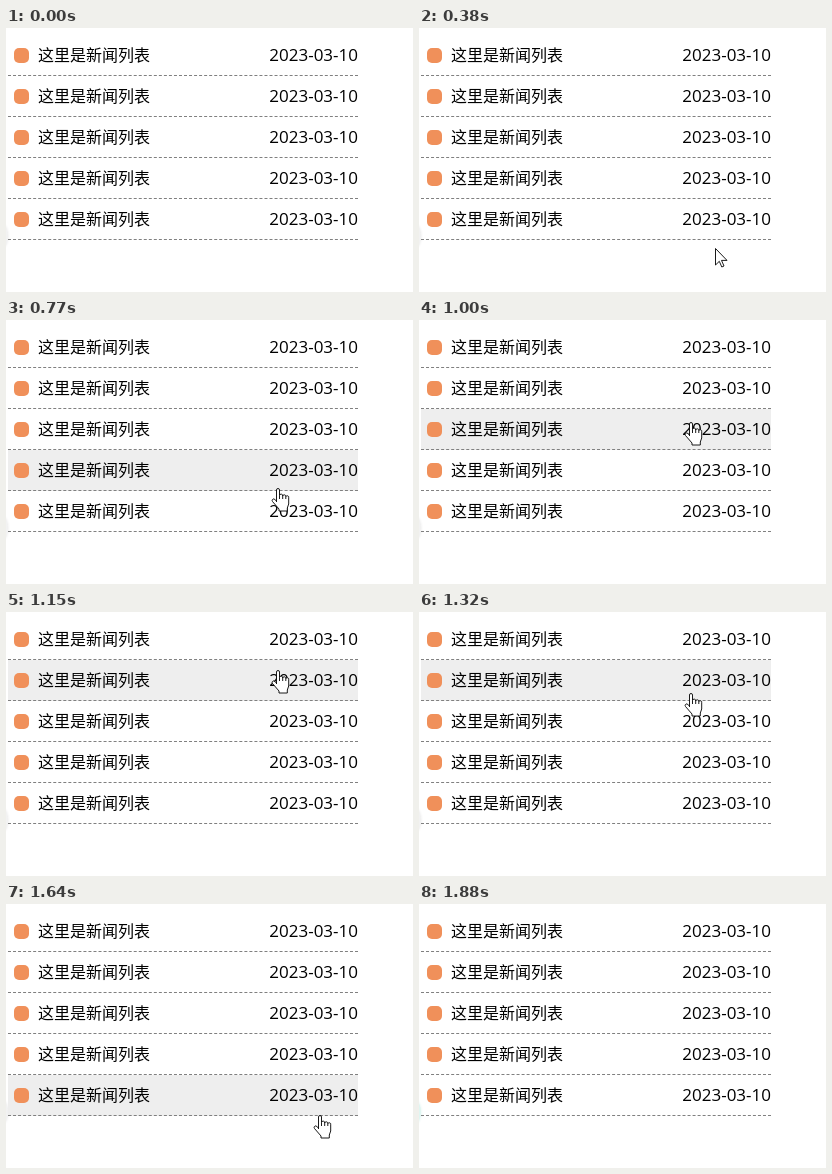
Recreate the animation shown at these times as an HTML page. Size 407 by 264 pixels, loop 2.26 s.

```html
<!DOCTYPE html>
<html lang="zh-CN">
<head>
<meta charset="utf-8">
<title>新闻列表</title>
<style>
  html, body { margin: 0; width: 100%; height: 100%; overflow: hidden; background: #fff; }
  #stage { position: relative; width: 407px; height: 264px; overflow: hidden; }
  ul { position: absolute; left: 2px; top: 7px; width: 350px; margin: 0; padding: 0; list-style: none; }
  li { position: relative; height: 40px; border-bottom: 1px dashed #808080; color: #000; }
  li.hover { background: #eee; }
  li i { position: absolute; left: 5.5px; top: 13px; width: 15px; height: 15px; border-radius: 5px; background: #f0905a; }
  li span { position: absolute; left: 30px; top: 0; white-space: nowrap;
    font: 16px/39px "Noto Sans CJK SC", "Noto Sans CJK", sans-serif; }
  li time { position: absolute; right: 0; top: 0; white-space: nowrap;
    font: 17px/39px "Open Sans", "Noto Sans", sans-serif; }
  #bubble { position: absolute; left: -34px; top: 190px; width: 36px; height: 36px; border-radius: 50%;
    background: #f2f2f2; box-shadow: 0 0 3px #e4e4e4; }
  #bubble.tinted { background: #e0f6f2; box-shadow: 0 0 3px #d8f2ee; }
  svg { position: absolute; left: 0; top: 0; }
  svg path { fill: #fff; stroke: #000; stroke-width: .9; stroke-linejoin: round; }
</style>
</head>
<body>
<div id="stage">
  <div id="bubble"></div>
  <ul id="list"></ul>
  <svg width="407" height="264">
    <g id="cursor">
      <path id="arrow" d="M.5 .5V17L4.3 13.3 6.8 19 9 18 6.5 12.4H12Z"/>
      <path id="hand" d="M-1.5 14V2a1.5 1.5 0 0 1 3 0V7.5a1.6 1.6 0 0 1 3.2 .5a1.6 1.6 0 0 1 3.1 .8a1.5 1.5 0 0 1 2.9 1V16L9.3 20V23H1V21L-5.5 13.5a1.6 1.6 0 0 1 1.5 -2.6L-1.5 13M1.5 7.5V11M4.7 8V11M7.8 9V11"/>
    </g>
  </svg>
</div>
<script>
  const LOOP = 2260, TICKS = 29, LEAD = 20;
  const ROW = 41, TOP = 7, ROWS = 5;

  // Key points of the pointer's tip; it moves evenly between them.
  const path = [
    { tick: 3, x: 332, y: 250 },
    { tick: 5, x: 296, y: 220 },
    { tick: 10, x: 272, y: 168 },
    { tick: 15, x: 272, y: 58 },
    { tick: 16, x: 272, y: 58 },
    { tick: 17, x: 272, y: 81 },
    { tick: 19, x: 280, y: 160 },
    { tick: 23, x: 347, y: 262 }
  ];

  const byId = id => document.getElementById(id);
  const mix = (a, b, k) => a + (b - a) * k;
  const show = (node, on) => node.style.display = on ? '' : 'none';

  byId('list').innerHTML =
    '<li><i></i><span>这里是新闻列表</span><time>2023-03-10</time></li>'.repeat(ROWS);
  const rows = [...byId('list').children];
  const cursor = byId('cursor'), arrow = byId('arrow'), hand = byId('hand'), bubble = byId('bubble');

  function pointerAt(tick) {
    const next = path.findIndex(point => point.tick >= tick);
    if (next < 0 || tick < path[0].tick) return null;
    const b = path[next], a = path[next - 1] || b;
    const k = a === b ? 0 : (tick - a.tick) / (b.tick - a.tick);
    return { x: mix(a.x, b.x, k), y: mix(a.y, b.y, k) };
  }

  function render(time) {
    const tick = Math.floor((time + LEAD) / LOOP * TICKS) % TICKS;
    const tip = pointerAt(tick);
    const hovered = tip ? Math.floor((tip.y - TOP) / ROW) : -1;
    const overRow = hovered >= 0 && hovered < ROWS;

    rows.forEach((row, i) => row.classList.toggle('hover', i === hovered));
    show(cursor, tip);
    show(hand, overRow);
    show(arrow, !overRow);
    if (tip) cursor.setAttribute('transform', `translate(${Math.round(tip.x)} ${Math.round(tip.y)})`);
    bubble.classList.toggle('tinted', tick >= path.at(-1).tick);
  }

  const start = performance.now();
  function frame() {
    render((performance.now() - start) % LOOP);
    requestAnimationFrame(frame);
  }
  frame();
</script>
</body>
</html>
```
